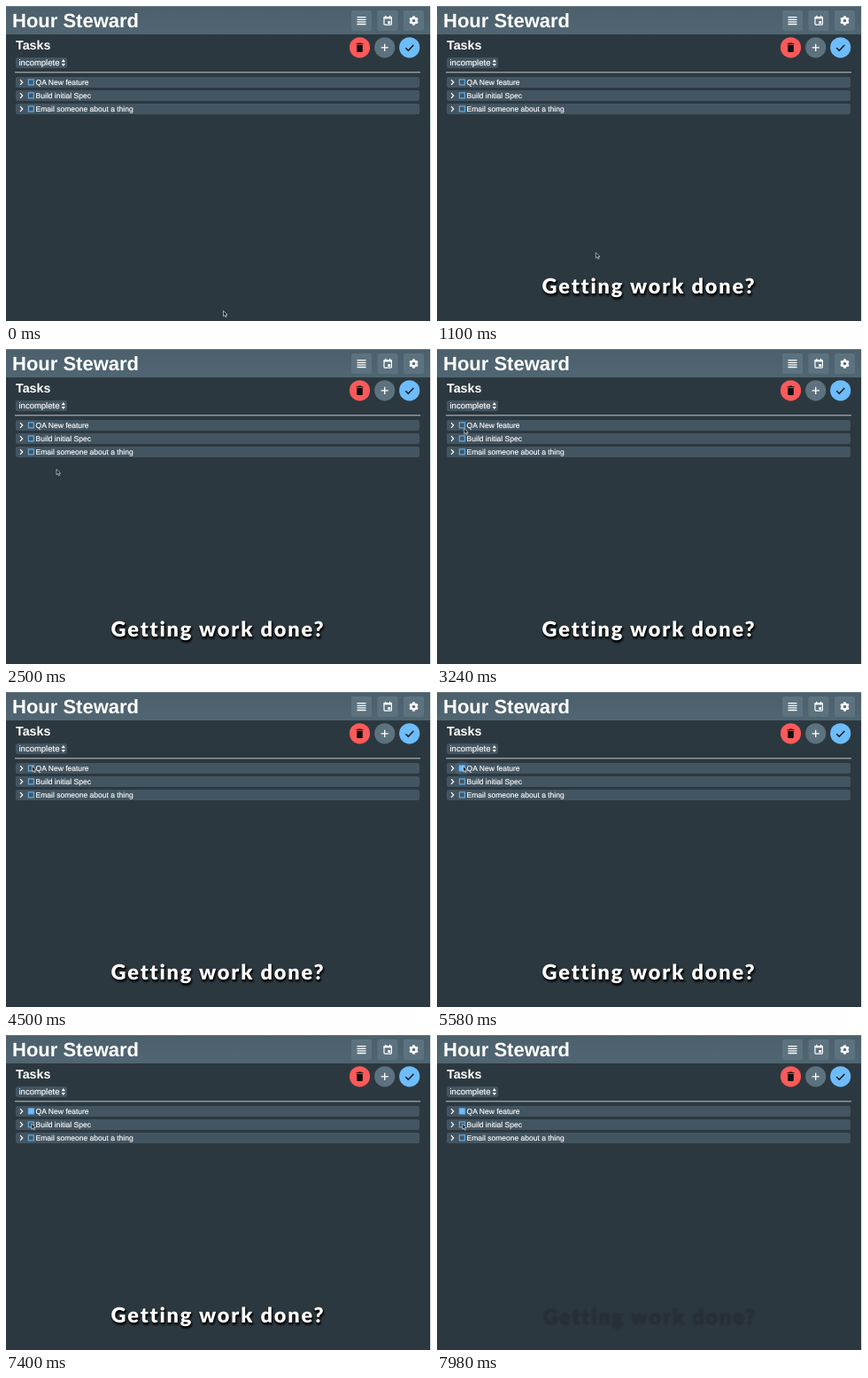
Animation, 480 px wide and 355 px high, one loop 8000 ms. Source, as an HTML page:

```html
<!DOCTYPE html>
<html lang="en">
<head>
<meta charset="utf-8">
<title>Tasks</title>
<style>
  html, body { margin: 0; width: 100%; height: 100%; overflow: hidden; background: #2c383f; }
  svg { display: block; width: 100%; height: 100%; }
  text { font-family: "Liberation Sans", Arial, sans-serif; fill: #fff; text-rendering: geometricPrecision; }
  .small { stroke: #fff; stroke-width: .15px; }
  .caption { font: 900 23.5px Lato, sans-serif; letter-spacing: 1.85px; text-anchor: middle; }
</style>
</head>
<body>
<svg viewBox="0 0 480 355">
  <defs>
    <filter id="blur" x="-10%" y="-40%" width="120%" height="180%">
      <feGaussianBlur stdDeviation="1.1"/>
    </filter>
    <linearGradient id="bar" x1="0" x2="0" y1="0" y2="1">
      <stop offset="0" stop-color="#4c606c"/>
      <stop offset="1" stop-color="#506672"/>
    </linearGradient>
  </defs>

  <rect width="480" height="355" fill="#2c383f"/>
  <rect width="480" height="32" fill="url(#bar)"/>
  <rect width="480" height="1" fill="#697b86"/>
  <text x="7" y="24" font-size="22" font-weight="700">Hour Steward</text>

  <g fill="#5c727f">
    <rect x="390" y="5" width="23" height="23" rx="2"/>
    <rect x="419.5" y="5" width="23" height="23" rx="2"/>
    <rect x="449" y="5" width="23" height="23" rx="2"/>
  </g>
  <path d="M396.500 12.700h10M396.500 15.300h10M396.500 17.900h10M396.500 20.500h10" stroke="#fff" stroke-width="1.300"/>
  <g fill="none" stroke="#fff" stroke-width="1.200">
    <rect x="427" y="12.500" width="8.400" height="8.600" rx=".8"/>
    <path d="M426.600 13.300h9.200" stroke-width="2.200"/>
    <path d="M428.800 10.800v2M433.600 10.800v2"/>
  </g>
  <rect x="431.300" y="17" width="2.800" height="2.800" fill="#fff"/>
  <g id="gear" transform="translate(460.500 16.500)">
    <circle r="3" fill="none" stroke="#fff" stroke-width="2.300"/>
  </g>

  <text x="11" y="48.500" font-size="14.300" font-weight="700">Tasks</text>
  <rect x="11" y="58" width="58" height="12" rx="2.500" fill="#435561"/>
  <text class="small" x="14.500" y="67.200" font-size="9.500">incomplete</text>
  <path d="M62.600 63.200l2.200-3.200 2.200 3.200zM62.600 64.900l2.200 3.200 2.200-3.200z" fill="#fff"/>

  <circle cx="399.500" cy="46.800" r="11.600" fill="#fc5a5a"/>
  <path d="M396.200 44h6.600v7.100q0 1-1 1h-4.600q-1 0-1-1zM395.500 42.200h2.100l.7-.8h2.400l.7.800h2.100v1.100h-8z" fill="#111"/>
  <circle cx="427.700" cy="46.800" r="11.600" fill="#5c727f"/>
  <path d="M423.600 46.800h8.200M427.700 42.700v8.200" stroke="#fff" stroke-width="1.300"/>
  <circle cx="455.700" cy="46.800" r="11.600" fill="#6dbcfb"/>
  <path d="M451.300 47.200l3 3 6-6.300" fill="none" stroke="#111" stroke-width="1.400"/>

  <rect x="10" y="74.300" width="458" height="1" fill="#bcc5ca"/>
  <g id="rows"></g>
  <circle id="ripple" cx="28.300" cy="86" fill="#6dbcfb"/>
  <rect x="479" width="1" height="355" fill="#e4e8ea"/>

  <text id="shade" class="caption" x="240.300" y="325.700" style="fill:#000;stroke:#000;stroke-width:1.200px" filter="url(#blur)">Getting work done?</text>
  <text id="caption" class="caption" x="239.500" y="323.800">Getting work done?</text>

  <path id="cursor" d="M0 0v6.200l1.500-1.300 1 2.300 1.100-.5-1-2.200h2z" fill="#15191c" stroke="#e4e8ea" stroke-width=".65"/>
</svg>
<script>
const LOOP = 8000;
const CLICK = 5400;
const $ = id => document.getElementById(id);

const tasks = ["QA New feature", "Build initial Spec", "Email someone about a thing"];
$("rows").innerHTML = tasks.map((name, i) => `
  <g transform="translate(0 ${80 + i * 15})">
    <rect x="11" width="456" height="12" rx="2" fill="#435561"/>
    <path d="M16 3.200l2.700 2.800-2.700 2.800" fill="none" stroke="#fff" stroke-width="1.200"/>
    <rect class="box" x="25.300" y="2.900" width="6" height="6" fill="none" stroke="#62b5f6" stroke-width="1.100"/>
    <text class="small" x="33.600" y="8.900" font-size="8.500">${name}</text>
  </g>`).join("");
const firstBox = document.querySelector(".box");

for (let a = 0; a < 360; a += 60) {
  $("gear").insertAdjacentHTML("beforeend",
    `<rect x="-1.300" y="-5.200" width="2.600" height="2" rx=".4" fill="#fff" transform="rotate(${a})"/>`);
}

// Pointer stops: time, x, y
const stops = [
  [0, 245.5, 343.5], [840, 245.5, 343.5], [1100, 179.7, 278.3], [1900, 57, 135.5],
  [2500, 57, 135.5], [3150, 30.7, 89.5], [3500, 30.7, 89.5], [4100, 29.5, 83.5],
  [5800, 29.5, 83.5], [6400, 28.8, 100], [LOOP, 28.8, 100]
];

const clamp = v => Math.max(0, Math.min(1, v));
const ramp = (t, from, to) => clamp((t - from) / (to - from));
const smooth = p => p * p * (3 - 2 * p);
const easeIn = p => p * p;
const easeOut = p => 1 - (1 - p) * (1 - p);

function pointer(t) {
  const i = Math.max(1, stops.findIndex(s => s[0] > t));
  const [t0, x0, y0] = stops[i - 1], [t1, x1, y1] = stops[i];
  const ease = i === 2 ? easeIn : i === 3 ? easeOut : smooth;
  const p = ease(ramp(t, t0, t1));
  return [x0 + (x1 - x0) * p, y0 + (y1 - y0) * p];
}

function draw(t) {
  const [x, y] = pointer(t);
  $("cursor").setAttribute("transform", `translate(${x} ${y})`);

  const fadeIn = ramp(t, 60, 560);
  $("caption").setAttribute("opacity", fadeIn * (1 - ramp(t, 7540, 7970)));
  $("shade").setAttribute("opacity", fadeIn * (1 - .88 * ramp(t, 7540, LOOP)));

  firstBox.setAttribute("fill", t >= CLICK ? "#6dbcfb" : "none");
  const wave = ramp(t, CLICK, CLICK + 350);
  $("ripple").setAttribute("r", 4 + 6 * easeOut(wave));
  $("ripple").setAttribute("opacity", wave > 0 ? .25 * (1 - wave) : 0);
}

const start = performance.now();
function tick() {
  draw((performance.now() - start) % LOOP);
  requestAnimationFrame(tick);
}
tick();
</script>
</body>
</html>
```
